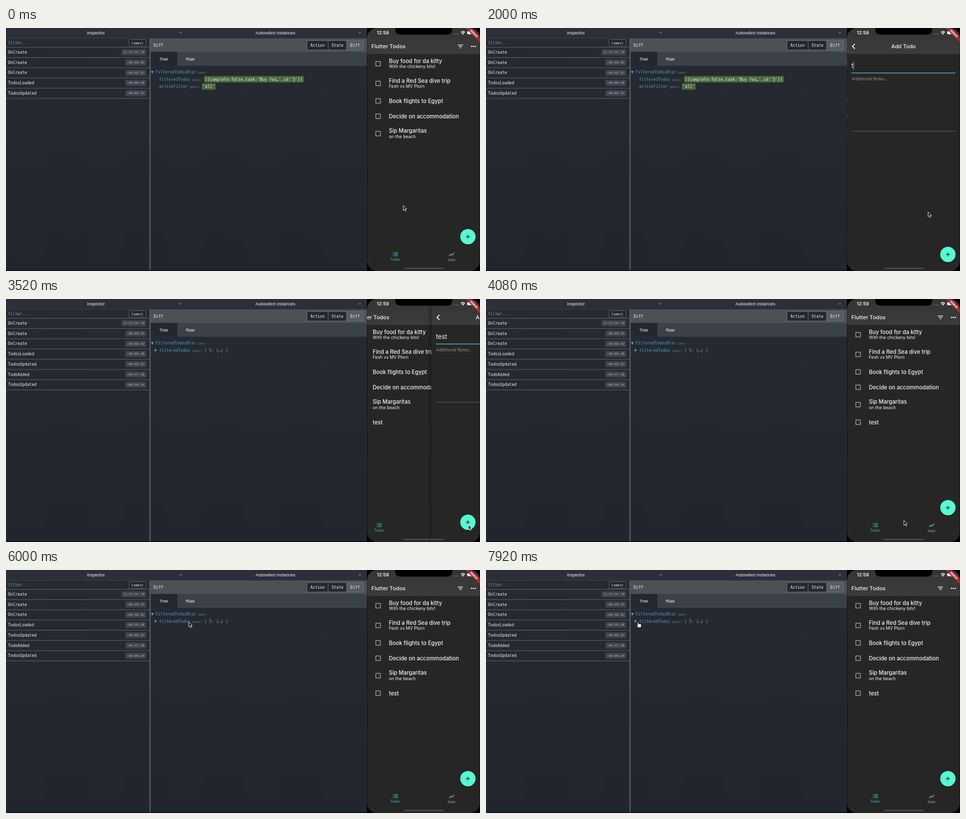
An HTML page for the animation above (8 s loop, 960 px wide and 492 px high).

```html
<!DOCTYPE html>
<html lang="en">
<head>
<meta charset="utf-8">
<title>Todo inspector</title>
<style>
  html, body { margin: 0; width: 100%; height: 100%; overflow: hidden; background: #000; }
  svg { display: block; }
  text { fill: #f2f3f4; white-space: pre; }
  .mono { font-family: "DejaVu Sans Mono", monospace; font-size: 8px; }
  .ui { font-family: "Liberation Sans", sans-serif; font-size: 8.8px; }
  .app { font-family: Inter, sans-serif; }
  .mid { text-anchor: middle; }
</style>
</head>
<body>
<svg id="stage" width="960" height="492" viewBox="0 0 960 492"></svg>
<script>
const LOOP = 8000, STEP = 80;
const PUSH = 760, POP = 3430, ADDED = 3440, SLIDE = 400;
const PHONE_X = 731, PHONE_W = 229;
const KEYS = [2000, 2160, 2320, 2480];
const WORD = 'test';

// [ms, x, y]
const POINTER = [
  [160, 804, 359], [720, 935, 420], [1280, 935, 420], [1680, 895, 372],
  [2800, 895, 372], [3280, 936, 457], [3680, 936, 457], [4080, 846, 448],
  [4320, 800, 211], [4800, 800, 211], [5120, 420, 94], [5600, 420, 94],
  [6000, 370, 105], [6400, 345, 107], [6960, 345, 107], [7360, 306, 105]
];
const HAND_FROM = 7360;

const rect = (x, y, w, h, fill, more = '') =>
  `<rect x="${x}" y="${y}" width="${w}" height="${h}" fill="${fill}" ${more}/>`;
const label = (x, y, str, cls, more = '') =>
  `<text x="${x}" y="${y}" class="${cls}" ${more}>${str}</text>`;
const app = (x, y, str, size, weight = 400, fill = '#f4f4f4', cls = '') =>
  label(x, y, str, 'app ' + cls, `style="font-size:${size}px;font-weight:${weight};fill:${fill}"`);
const mono = (x, y, str, fill = '#f2f3f4', size = 8) =>
  label(x, y, str, 'mono', `style="fill:${fill};font-size:${size}px"`);
const path = (d, stroke, width = 1, fill = 'none') =>
  `<path d="${d}" fill="${fill}" stroke="${stroke}" stroke-width="${width}"/>`;
const group = (id, body, more = '') => `<g id="${id}" ${more}>${body}</g>`;

function eventRow([name, time], i) {
  const y = 39 + i * 20.7;
  const w = time.length * 3.92 + 7;
  return mono(4, y + 13, name)
    + rect(284 - w, y + 4, w, 12.5, '#3c424b', 'rx="1.5"')
    + mono(287.5 - w, y + 12.3, time, '#a9afb7', 6.5)
    + rect(0, y + 20, 291, 1.6, '#4b5159');
}

const EVENTS = [
  ['OnCreate', '12:53:34.78'], ['OnCreate', '+00:00.05'], ['OnCreate', '+00:00.02'],
  ['TodosLoaded', '+00:00.48'], ['TodosUpdated', '+00:00.02'],
  ['TodoAdded', '+05:47.48'], ['TodosUpdated', '+00:00.04']
];

function inspector() {
  const rows = EVENTS.map(eventRow);
  const caret = x => `<path d="M${x} 8.2h7l-3.5 4z" fill="#5d646d"/>`;
  const tool = (x, w, str, fill) =>
    rect(x, 25.5, w, 19, fill, 'stroke="#6c7278" stroke-width="1"')
    + label(x + w / 2, 37.7, str, 'mono mid');
  return rect(0, 0, 731, 492, 'url(#panel)')
    + rect(0, 0, 731, 21, '#2a2f3a')
    + label(182, 13, 'Inspector', 'ui mid') + caret(350)
    + label(545.5, 13, 'Autoselect instances', 'ui mid') + caret(713)
    + rect(0, 20.5, 291, 1, '#3b4149')
    + mono(4, 33, 'filter...', '#9299a1')
    + rect(249, 23.5, 34.5, 13.5, '#20252d', 'rx="2" stroke="#636a72"')
    + label(266.2, 32.8, 'Commit', 'mono mid', 'style="font-size:6.7px"')
    + rect(0, 38.4, 291, 1.6, '#4b5159')
    + rows.slice(0, 5).join('') + group('newEvents', rows.slice(5).join(''))
    + rect(290.5, 21, 2.5, 471, '#565c62')
    + rect(293, 21, 438, 28, '#4c5154') + mono(299, 37.5, 'Diff')
    + tool(609.5, 43, 'Action', '#232830') + tool(652.5, 37.5, 'State', '#232830')
    + tool(690, 34, 'Diff', '#555b61')
    + rect(293, 48.5, 438, 28, '#3b4148') + rect(293, 48.5, 54, 28, '#232830')
    + label(319.3, 65.7, 'Tree', 'ui mid') + label(373, 65.7, 'Raw', 'ui mid')
    + tree() + rect(0, 490.5, 731, 1.5, '#0c0d10');
}

function tree() {
  const blue = '#4f9fbb', grey = '#8b9199', tan = '#bd8a70';
  const pin = (x, y) => mono(x, y, '(pin)', grey, 5.7);
  const key = (y, name, x) =>
    mono(310, y, name, blue) + pin(x, y) + mono(x + 17, y, ':', grey);
  const value = (x, y, w, str) =>
    rect(x, y - 9.3, w, 13, '#4c683f', 'rx="2"') + mono(x + 2, y, str, '#eef2e6');
  return `<path d="M293.5 87h6l-3 5.5z" fill="${blue}"/>`
    + mono(303, 92, 'FilteredTodosBloc', blue) + pin(388, 92)
    + key(106.5, 'filteredTodos', 376)
    + group('before',
        value(401, 106.5, 202, "[{complete:false,task:'Buy foo…',id:'5'}]")
        + key(121.2, 'activeFilter', 371) + value(396.5, 121.2, 28, "'all'"))
    + group('after',
        `<path d="M301 100.7v6l5-3z" fill="${blue}"/>`
        + mono(401.5, 106.5, '{ 5: {…} }', tan));
}

const header = rect(PHONE_X, 0, PHONE_W, 52.5, 'url(#bar)');
const body = rect(PHONE_X, 0, PHONE_W, 492, '#262626');

function todo(mid, title, note) {
  return rect(749, mid - 4.7, 9.2, 9.2, 'none', 'stroke="#b4b4b4" stroke-width="1.2"')
    + app(775.5, mid + (note ? -1.8 : 4), title, 11.1, 500)
    + (note ? app(775.5, mid + 9, note, 8.8) : '');
}

function listPage() {
  const cyan = '#45b8c6', pale = '#a5a5a5';
  const lines = [454.8, 457.8, 460.8]
    .map(y => path(`M783.5 ${y}h1.6M786.3 ${y}h7.4`, cyan, 1.3)).join('');
  const dots = [943, 946.7, 950.4]
    .map(x => `<circle cx="${x}" cy="37.3" r="1.3" fill="#fff"/>`).join('');
  return body + header
    + app(740, 41, 'Flutter Todos', 11, 500)
    + path('M915.2 34.3h10.4M917 37.3h6.8M919.2 40.3h2.4', '#fff', 1.2) + dots
    + todo(72.3, 'Buy food for da kitty', 'With the chickeny bits!')
    + todo(112.3, 'Find a Red Sea dive trip', 'Fesh vs MV Plorn')
    + todo(147.7, 'Book flights to Egypt')
    + todo(178.8, 'Decide on accommodation')
    + todo(214, 'Sip Margaritas', 'on the beach')
    + group('newTodo', todo(249.6, WORD))
    + lines + app(788.5, 471.3, 'Todos', 7.1, 400, cyan, 'mid')
    + path('M897.5 461.5l3.6-3.8 2.4 2.3 4.4-5.2', pale, 1.3)
    + app(902.3, 471.5, 'Stats', 6.6, 400, pale, 'mid');
}

function addPage() {
  return rect(723, 0, 8, 492, 'url(#edge)') + body + header
    + path('M747 32.2l-4.8 5 4.8 5', '#fff', 1.7)
    + app(845.5, 41, 'Add Todo', 10.8, 500, '#f4f4f4', 'mid')
    + group('hint', app(740.5, 81, 'What needs to be done?', 13, 400, '#858585'))
    + `<text id="entry" x="740" y="81" class="app" style="font-size:13px"></text>`
    + rect(740, 68, 1.4, 17, '#3d8fc4', 'id="caret"')
    + rect(740, 90.4, 211, 1, '#6c6c6c', 'id="underline"')
    + app(740.5, 105.8, 'Additional Notes...', 8.65, 400, '#8e8e8e')
    + rect(740, 208.5, 211, 1, '#636363');
}

function phone() {
  const tiny = [908.5, 911.3, 914.1, 916.9]
    .map(x => `<circle cx="${x}" cy="12.3" r=".7" fill="#999"/>`).join('');
  const fab = `<circle cx="935.5" cy="424.5" r="15.8" fill="#000" opacity=".22"/>
    <circle cx="935.5" cy="422.5" r="15.5" fill="#57f9d3"/>`
    + path('M931.5 422.5h8M935.5 418.5v8', '#17302b', 1.3);
  const wifi = path('M921.2 8.8q4.3-3.6 8.6 0M922.8 10.7q2.7-2.2 5.4 0', '#fff', 1.3)
    + '<path d="M923.9 11.7q1.6-1.2 3.2 0l-1.6 1.7z" fill="#fff"/>';
  const banner = `<g transform="translate(948 11) rotate(45)">`
    + rect(-30, -4.6, 60, 9.2, '#a32a35')
    + app(0, 2.2, 'DEBUG', 5.6, 800, '#fff', 'mid') + '</g>';
  return rect(PHONE_X, 0, PHONE_W, 492, '#000')
    + `<g clip-path="url(#screen)">`
    + group('list', listPage()) + group('add', addPage()) + group('fab', fab)
    + app(751, 13.2, '12:59', 9.3, 600) + tiny + wifi
    + rect(934, 6.7, 10, 5.8, '#fff', 'rx="1.4"') + banner
    + rect(805.5, 485.3, 81, 3, '#484848', 'rx="1.5"') + '</g>'
    + '<path d="M785 0q3.5 0 3.5 3q0 10.5 11 10.5h93q11 0 11-10.5q0-3 3.5-3z" fill="#000"/>';
}

document.getElementById('stage').innerHTML = `<defs>
  <linearGradient id="panel" x2="0" y2="1"><stop stop-color="#252a33"/><stop offset="1" stop-color="#21262e"/></linearGradient>
  <linearGradient id="bar" x2="0" y2="1"><stop stop-color="#343434"/><stop offset="1" stop-color="#3c3c3c"/></linearGradient>
  <linearGradient id="edge"><stop stop-opacity="0"/><stop offset="1" stop-opacity=".3"/></linearGradient>
  <clipPath id="screen"><rect x="731.5" y="0" width="228" height="492" rx="20"/></clipPath>
</defs>` + inspector() + phone() + group('pointer',
  group('arrow', path('M.4 .4v9.6l2.2-2 1.6 3.7 1.8-.8-1.6-3.6h3z', '#fff', 0.9, '#0a0a0a'))
  + group('hand', path('M1 5.6V1.2q1-1.3 2 0v3q3-.7 5.4 1v3l-1.2 3.2H2.6L-.8 7.4q.2-1.7 1.8-.3z', '#111', 0.7, '#fff')));

const el = Object.fromEntries([...document.querySelectorAll('[id]')].map(n => [n.id, n]));

function bezier(x1, y1, x2, y2) {
  const at = (s, a, b) => 3 * (1 - s) * (1 - s) * s * a + 3 * (1 - s) * s * s * b + s * s * s;
  return x => {
    if (x <= 0) return 0;
    if (x >= 1) return 1;
    let lo = 0, hi = 1;
    for (let i = 0; i < 24; i++) {
      const s = (lo + hi) / 2;
      if (at(s, x1, x2) < x) lo = s; else hi = s;
    }
    return at(lo, y1, y2);
  };
}
const slideEase = bezier(.35, .91, .33, .97);
const heroEase = bezier(.4, 0, .2, 1);
const pointerEase = bezier(.4, 0, .6, 1);

// 0 while the list is shown, 1 while the form is shown
const openness = (t, ease) => ease((t - PUSH) / SLIDE) - ease((t - POP) / SLIDE);

function pointerAt(t) {
  const next = POINTER.findIndex(p => p[0] > t);
  if (next === 0) return POINTER[0].slice(1);
  if (next < 0) return POINTER.at(-1).slice(1);
  const [t0, x0, y0] = POINTER[next - 1], [t1, x1, y1] = POINTER[next];
  const k = pointerEase((t - t0) / (t1 - t0));
  return [x0 + (x1 - x0) * k, y0 + (y1 - y0) * k];
}

const move = (node, x, y) => node.setAttribute('transform', `translate(${x} ${y})`);
const show = (node, on) => node.setAttribute('visibility', on ? 'visible' : 'hidden');

function draw(t) {
  const open = openness(t, slideEase);
  move(el.list, -open * PHONE_W / 3, 0);
  move(el.add, (1 - open) * PHONE_W, 0);
  show(el.add, open > 0);
  move(el.fab, 0, 36 * openness(t, heroEase));

  const added = t >= ADDED;
  show(el.newEvents, added);
  show(el.newTodo, added);
  show(el.after, added);
  show(el.before, !added);

  const typed = KEYS.filter(k => k <= t);
  const focused = t >= 1200;
  el.entry.textContent = WORD.slice(0, typed.length);
  show(el.hint, open > 0 && !typed.length);
  el.caret.setAttribute('x', 740 + (typed.length ? el.entry.getComputedTextLength() : 0));
  const since = t - (typed.at(-1) ?? 1040);
  show(el.caret, open > 0 && !added && since >= 0 && since % 1000 < 500);
  el.underline.setAttribute('fill', focused ? '#43b5c3' : '#6c6c6c');
  el.underline.setAttribute('height', focused ? 1.5 : 1);

  move(el.pointer, ...pointerAt(t));
  show(el.arrow, t < HAND_FROM);
  show(el.hand, t >= HAND_FROM);
}

const start = performance.now();
function tick() {
  const t = (performance.now() - start) % LOOP;
  draw(Math.floor(t / STEP) * STEP);
  requestAnimationFrame(tick);
}
tick();
</script>
</body>
</html>
```
